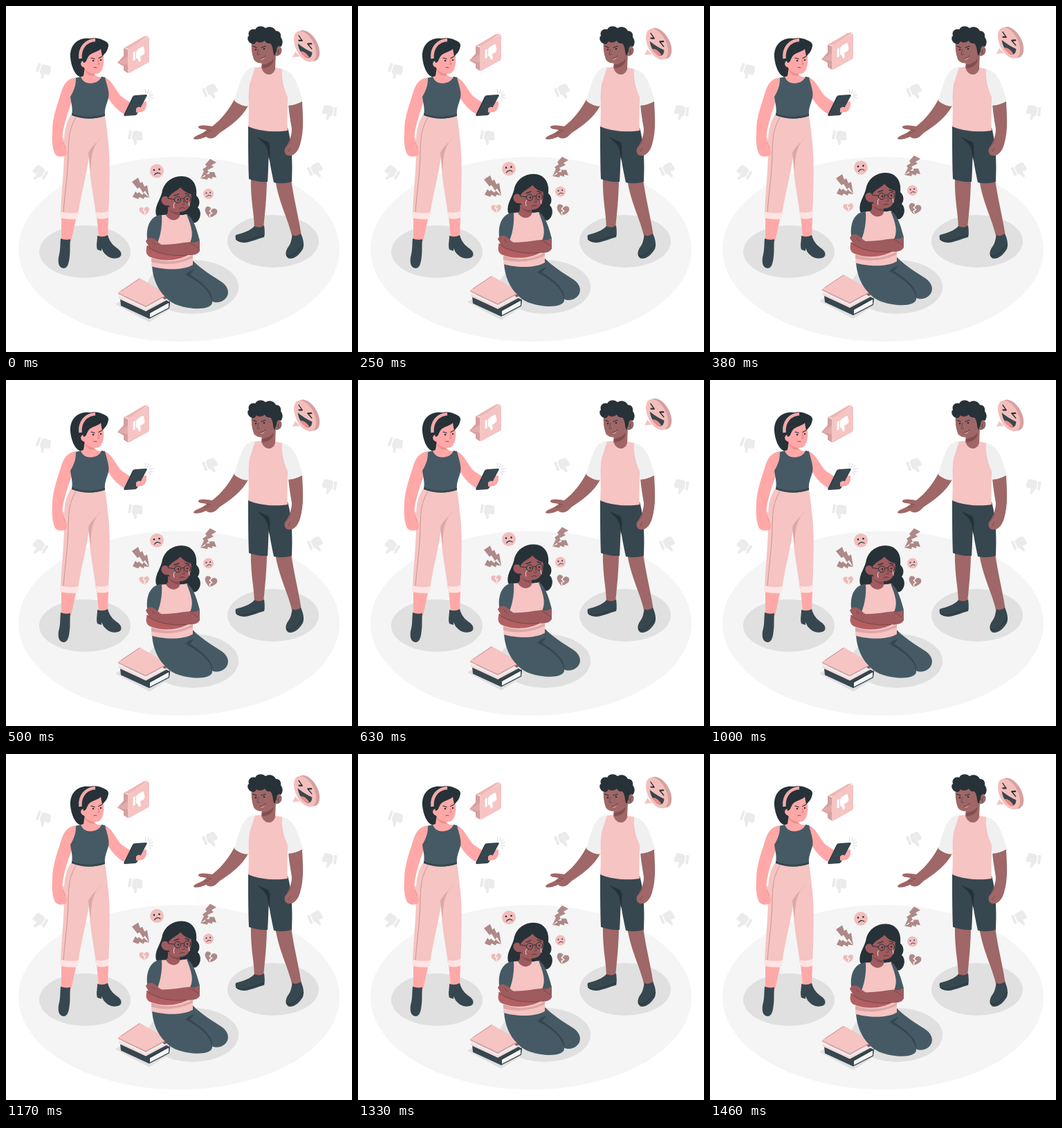
Write an HTML page that moves like this. It is 500 px wide and 500 px high and loops after 1500 ms.

```html
<!DOCTYPE html>
<html lang="en">
<head>
<meta charset="utf-8">
<title>Bullying scene</title>
<style>
html, body { margin: 0; width: 100%; height: 100%; overflow: hidden; background: #fff; }
svg { display: block; width: 100vw; height: 100vh; }
.ink { fill: #263238; }
.slate { fill: #455a64; }
.deep { fill: #37474f; }
.rose { fill: #f5c4c3; }
.peach { fill: #ffa8a7; }
.brown { fill: #9f6767; }
.tan { fill: #9f5b5e; }
.mauve { fill: #ae8988; }
.white { fill: #fff; }
.pen { fill: none; stroke: #263238; stroke-width: 1.2; stroke-linecap: round; stroke-linejoin: round; }
.fine { stroke-width: .7; }
.bold { stroke-width: 2; }
</style>
</head>
<body>
<svg viewBox="0 0 500 500" xmlns="http://www.w3.org/2000/svg">
  <defs>
    <path id="thumb" d="M-10.500 -9 H-6.500 V4 H-10.500 Z M-5 -8 Q-2 -10 1 -10 H6 Q9 -10 9 -7 L10.500 0 Q10.500 3 8 3 H2.500 L3.500 9 Q3 12 0 10.500 L-1.500 6 L-5 2 Z"/>
    <g id="sad">
      <circle r="10" fill="#f1bebd"/>
      <circle class="ink" cx="-4" cy="-1.500" r="1.300"/>
      <circle class="ink" cx="3.500" cy="-2.500" r="1.300"/>
      <path class="pen" d="M-3.500 5.500 Q0 .5 5 4"/>
    </g>
    <g id="heart">
      <path d="M0 8 C-5 5 -10 1 -9 -4 C-8 -8 -2 -8 0 -4 C3 -8 9 -7 9 -2 C9 2 4 6 0 8 Z"/>
      <path d="M0 -5 L-2 -1 L2 1 L-1 4 L1 7" fill="none" stroke="#fff" stroke-width="1.300"/>
    </g>
  </defs>

  <ellipse cx="250" cy="351.500" rx="232" ry="133.500" fill="#f5f5f5"/>
  <g fill="#e0e0e0">
    <ellipse cx="114" cy="355" rx="66" ry="38"/>
    <ellipse cx="386" cy="340" rx="66" ry="38"/>
    <ellipse cx="270" cy="406" rx="66" ry="39"/>
  </g>
  <g id="thumbs" fill="#ebebeb"></g>

  <!-- woman with phone -->
  <g>
    <path class="peach" d="M80 304 H102 L94 340 H80 Z M131 304 H148 L147 334 H134 Z"/>
    <path class="deep" d="M79 336 Q86 339 93 337 C92 348 93 353 92 361 C91 372 89 379 83 379 C76 378 75 371 76 363 C79 353 78 345 79 336 Z"/>
    <path class="deep" d="M132 332 Q140 335 147 331 C150 342 155 346 162 351 C168 356 168 362 162 364 C152 367 145 361 141 356 L138 350 L138 354 L132 352 C130 346 132 340 132 332 Z"/>
    <path class="rose" d="M94 157 C87 168 84 180 84 196 C85 230 80 268 79 300 L104 302 C108 272 116 246 120 218 C120 246 127 275 130 302 L148 300 C150 265 151 215 147 190 C146 176 144 166 143 158 Z"/>
    <path d="M137 190 C133 197 126 199 119 212 L120 222 C121 228 122 235 122.500 241 C123 225 122 205 137 190 Z" fill="#dca7a6"/>
    <path d="M101 161 C91 178 91 190 90 208 C90 240 85 270 83 298" fill="none" stroke="#ba8b8a" stroke-width=".8"/>
    <path d="M78 297 Q92 301 105 298 L103 308 Q90 309 78 306 Z M130 298 Q140 300 149 296 L148 306 Q140 309 132 307 Z" fill="#fde5e4"/>
    <path class="peach" d="M142 103 C153 106 158 122 167 131 L182 141 L175 158 C164 154 154 144 146 130 Z M184 141 C190 136 195 139 203 138 C204 148 197 154 187 154 Z"/>
    <path class="peach" d="M102 103 C90 104 83 112 79 127 C73 147 67 161 67 181 C66 194 67 206 71 214 C75 219 82 218 86 216 C90 213 88 208 85 202 C82 195 81 190 82 184 C84 170 90 152 95 138 Z"/>
    <path d="M83 191 Q82 199 86 205" fill="none" stroke="#e58583" stroke-width=".8"/>
    <path class="peach" d="M111 84 L128 94 C127 101 131 102 138 103 C138 117 110 117 104 104 C111 103 112 98 111 84 Z"/>
    <path d="M113 91 Q121 98 128 97 L127 101 Q117 101 113 91 Z" fill="#f08d8b"/>
    <path class="slate" d="M101 104 L108 102 C112 116 134 114 138 102 L143 103 C146 115 150 125 148 133 C146 141 142 148 143 158 C128 165 108 163 95 157 C97 148 94 140 93 131 C99 122 101 112 101 104 Z"/>
    <path d="M95 155 Q118 164 143 156 V159 Q118 167 95 158 Z" class="deep"/>
    <path class="ink" d="M112 101 C102 107 94 88 93 74 C92 56 104 45 121 47 C134 44 142 50 147 54 C149 61 145 68 139 72 L114 88 Z"/>
    <path class="peach" d="M113 76 C115 67 127 63 137 61 C141 67 142 76 141 83 C140 93 136 99 128 98 C120 97 115 94 113 89 C107 88 106 79 113 79 Z"/>
    <path class="ink" d="M112 82 C107 64 115 48 130 48 C141 47 149 53 148 57 C146 67 139 73 139 73 L137 62 C132 67 123 67 119 73 C116 78 116 82 112 82 Z"/>
    <path d="M107.500 76 C106 61 115 50 129 49" fill="none" stroke="#f3aaa8" stroke-width="4.600"/>
    <path class="pen" d="M123 75 L128 76.500 M134 75.500 L138.500 73"/>
    <circle class="ink" cx="126" cy="79" r="1.300"/>
    <circle class="ink" cx="137" cy="78" r="1.200"/>
    <path d="M133 78 L135 84 L132 84" fill="none" stroke="#d86b69" stroke-width=".8"/>
    <path class="pen fine" d="M127 89 Q129 88 131 89"/>
    <path class="deep" d="M183 131 Q184 129 187 129 L202 128 Q205 128 203 131 L190 155 Q189 158 186 158 L172 159 Q169 159 171 156 Z"/>
    <path d="M184 131 L171 157" stroke="#263238" stroke-width="1"/>
    <path class="peach" d="M188 148 Q192 144 195 147 L199 141 L203 140 Q204 149 197 153 L188 154 Z"/>
    <path id="flash" fill="none" stroke="#c9c9c9" stroke-width=".8"/>
  </g>

  <!-- man pointing -->
  <g>
    <path class="brown" d="M354 248 H377 C377 275 374 300 372 322 L359 324 C359 300 353 280 354 248 Z M389 250 L412 250 C416 280 424 310 427 333 L414 336 C409 310 394 285 389 250 Z"/>
    <path class="deep" d="M359 318 Q367 322 373 317 C374 325 374 331 373 334 C364 336 355 341 345 342 C335 342 330 338 332 331 C342 328 353 325 359 318 Z"/>
    <path class="deep" d="M414 331 Q420 334 426 329 C430 337 431 345 429 351 C425 358 418 366 409 365 C403 362 403 355 408 348 C412 343 412 338 414 331 Z"/>
    <path d="M332 337 Q338 341 348 339 L373 331 M405 360 Q411 364 418 358 L430 344" fill="none" stroke="#263238" stroke-width=".9"/>
    <path class="deep" d="M350 172 L407 176 C411 190 415 215 413 254 Q400 258 387 255 C384 240 381 228 380 214 C379 228 379 240 378 254 Q364 255 351 250 C350 225 350 200 350 172 Z"/>
    <path class="ink" d="M364 190 C369 197 378 198 379 216 L382 227 C380 209 384 201 378 196 Z"/>
    <path class="brown" d="M330 135 L350 144 C341 161 325 173 308 184 C302 191 296 194 289 189 C283 192 274 194 271 192 C271 188 278 187 285 183 L290 179 C284 178 277 178 278 174 C284 171 292 173 298 174 C312 163 322 150 330 135 Z"/>
    <path d="M290 179 L297 181 M285 184 L293 183" fill="none" stroke="#794646" stroke-width=".8"/>
    <path class="brown" d="M408 142 L428 138 C429 160 431 180 425 200 C422 211 415 218 407 216 C402 214 401 207 405 203 C410 195 413 186 413 178 C411 165 409 155 408 142 Z"/>
    <path d="M405 203 Q410 199 411 193 M411 205 L408 211" fill="none" stroke="#794646" stroke-width=".8"/>
    <path d="M361 88 C345 89 340 100 330 137 Q338 144 349 145 L354 120 Z M397 91 C412 92 420 105 429 137 Q420 143 408 144 L400 115 Z" fill="#f0f0f0"/>
    <path class="rose" d="M360 89 L369 88 L389 89 L399 91 C398 106 401 118 407 132 C407 152 406 168 407 180 C390 183 365 181 350 174 C352 150 349 130 352 113 Z"/>
    <path class="brown" d="M370 78 L390 67 L389 91 C386 102 373 102 369 89 Z"/>
    <path d="M370 85 Q382 83 387 76 Q386 88 371 90 Z" fill="#824e4e"/>
    <path class="brown" d="M355 50 C354 60 355 69 358 77 C362 84 371 84 379 80 L389 72 C399 74 402 60 394 58 L383 44 L362 42 Z"/>
    <path class="ink" d="M357 55 C350 54 347 46 351 43 C349 37 354 32 360 34 C364 27 372 29 375 32 C381 28 388 31 390 36 C396 36 398 41 397 45 C401 50 400 56 397 59 C393 57 391 60 391 65 L388 72 C385 68 387 60 382 54 C379 55 375 53 374 50 C369 54 364 53 362 51 C360 55 358 55 357 55 Z"/>
    <path class="pen" d="M357 58 L362 60 M369 60 L375 58"/>
    <circle class="ink" cx="361" cy="63" r="1.300"/>
    <circle class="ink" cx="373" cy="62" r="1.300"/>
    <path d="M365 62 L363 70 L367 70" fill="none" stroke="#6b3d3d" stroke-width=".8"/>
    <path d="M367 76 Q371 76 374 73 Q374 78 369 78 Z" fill="#d98583"/>
    <path class="pen fine" d="M367 76 Q371 76 375 72 M394 63 Q392 66 394 69"/>
  </g>

  <g id="float">
    <!-- thumb bubble -->
    <path d="M170 61 L199 44 L206 43 L178 62 Z" fill="#efb6b4"/>
    <path d="M170 61 L176 63 V97 L170 93 V87 L161 82 L170 72 Z" fill="#d3a09f"/>
    <path d="M161 82 L176 73 V85 Z" fill="#e3acab"/>
    <path class="rose" d="M176 64 Q176 62 178 61 L204 45 Q207 44 207 47 V79 Q207 81 205 82 L178 97 Q176 98 176 95 Z"/>
    <use href="#thumb" class="white" transform="matrix(.8 -.45 0 .95 192 71)"/>

    <!-- laughing bubble -->
    <g transform="matrix(.84 .5 0 1 436.500 57.500)"><circle r="20" fill="#d6a19f"/></g>
    <path class="rose" d="M418 66 L414 74 L425 73 Z"/>
    <g transform="matrix(.8 .5 0 1 432 58.500)">
      <circle r="20" fill="#f3bfbd"/>
      <path class="deep" d="M-13 2 Q0 4 13 2 C12 19 -10 19 -13 2 Z"/>
      <path d="M-8 11 Q0 6 8 11.500 C4 16 -4 16 -8 11 Z" fill="#f08a88"/>
      <path class="pen bold" d="M-11 -10 L-5 -6 L-11 -3 M12 -10 L5 -6 L12 -3"/>
    </g>

    <!-- icons round the girl -->
    <use href="#sad" transform="translate(218 238.500)"/>
    <use href="#sad" transform="translate(292.500 271.500) scale(.75)"/>
    <use href="#heart" transform="translate(200 296) rotate(-8) scale(.8)" fill="#edbbb9"/>
    <use href="#heart" transform="translate(296 298) rotate(14)" class="mauve"/>
    <path class="mauve" d="M182 254 L190 264 L193 262 L198 270 L201 267 L207 277 L204 259 L200 261 L197 254 L194 256 L191 248 Z M183 276 L191 279 L193 276 L199 279 L200 276 L207 277 L199 270 L197 273 L192 269 L190 271 L187 268 Z"/>
    <path class="mauve" d="M295 221 L288 229 L290 232 L284 236 L286 239 L281 249 L293 240 L291 237 L300 233 L297 230 L304 226 Z M301 240 L294 240 L294 243 L288 243 L288 246 L281 249 L291 251 L292 248 L298 250 L298 247 L304 248 Z"/>

    <!-- books -->
    <path d="M158 431 L192 410 L240 436 L207 457 Z" fill="#e0e0e0"/>
    <path class="deep" d="M165 423 L195 406 L237 428 L236 437 L207 452 L166 433 Z"/>
    <path d="M208 444 L235 429 V436 L208 450 Z" fill="#f5f5f5"/>
    <path class="pen fine" d="M207 443 L237 427"/>
    <path d="M162 416 L202 435 L233 418 L232 425 L202 441 L163 421 Z" fill="#eeeeee"/>
    <path d="M163 420 L202 438 L232 423 V425 L202 441 L163 423 Z" fill="#f9d9d8"/>
    <path d="M225 421 L232 417 V423 L229 424 Z" fill="#8e5d5d"/>
    <path class="rose" d="M162 414 L193 393 L233 416 V418 L202 435 L162 416 Z"/>
    <path d="M162 415 L202 434 L233 417 M166 412 L193 394" fill="none" stroke="#c88f8e" stroke-width=".9"/>

    <!-- girl -->
    <path class="ink" d="M254 246 C241 246 230 253 226 266 C224 280 214 288 217 302 C222 309 236 308 243 304 L262 301 C264 310 269 314 274 313 C282 309 283 296 277 291 C281 286 280 278 275 274 C277 257 268 246 254 246 Z"/>
    <path class="slate" d="M211 375 C230 381 255 380 270 368 C282 380 298 390 312 399 C322 406 324 417 316 424 C310 429 303 429 298 427 C299 436 284 438 270 437 C250 435 237 429 230 420 C219 410 212 393 211 375 Z"/>
    <path d="M272 381 C266 382 263 385 259 388 C275 397 294 408 298 427 C301 412 280 397 266 388 Z" class="deep"/>
    <path class="rose" d="M221 303 C232 300 250 304 262 301 C270 316 268 330 270 345 V374 C255 383 225 381 210 376 L213 345 Z"/>
    <path class="slate" d="M225 302 C214 302 206 310 204 325 Q203 335 205 340 Q212 343 219 342 C224 330 226 314 225 302 Z M261 301 C270 305 275 320 280 339 Q272 344 266 342 C273 328 265 312 261 301 Z"/>
    <path class="tan" d="M234 290 L251 296 V304 C247 312 236 311 231 302 C235 299 234 296 234 290 Z"/>
    <path d="M235 293 Q243 300 251 298 L250 302 Q240 301 235 293 Z" fill="#834b4b"/>
    <path class="tan" d="M235 270 C241 267 247 264 250 260 C255 265 261 267 267 267 C269 280 267 294 256 297 C247 299 238 295 235 288 C227 291 220 279 228 275 Q233 274 235 278 Z"/>
    <path class="ink" d="M234 278 C230 264 240 252 253 250 C264 250 271 260 269 272 C262 271 256 267 252 262 C247 268 239 269 234 278 Z"/>
    <g fill="none" stroke="#263238" stroke-width="1">
      <circle cx="248" cy="280" r="4.600"/>
      <circle cx="262" cy="279" r="4.600"/>
      <path d="M252.500 279 Q255 277 257.500 278.500 M243.500 279.500 L234 278"/>
    </g>
    <path class="pen" d="M243 274 L250 271.500 M259 271 L265 273"/>
    <circle class="ink" cx="249" cy="280" r="1.300"/>
    <circle class="ink" cx="262" cy="279" r="1.300"/>
    <path d="M244 284 Q241 287 243 292 M264 283 L265 289" fill="none" stroke="#fff" stroke-width=".8" stroke-linecap="round"/>
    <path d="M256 280 L258 287 L254 287" fill="none" stroke="#6f3b3b" stroke-width=".8"/>
    <path class="pen fine" d="M251 292.500 Q255 290 258 292"/>
    <path d="M210 364 Q240 376 270 360 V364 Q240 378 210 370 Z" fill="#dca7a6"/>
    <path d="M204 346 C201 355 203 361 209 363 C227 370 250 368 264 359 C240 358 220 355 204 346 Z" fill="#b45f62"/>
    <path class="tan" d="M202 340 C204 335 209 334 213 336 C218 338 220 343 225 345 C240 345 254 342 266 341 Q273 343 280 339 V354 C276 361 268 360 261 360 C240 362 222 359 209 352 Z"/>
    <path d="M203 347 C220 359 240 362 262 360 M211 341 L216 345 M266 342 L278 350" fill="none" stroke="#763f40" stroke-width=".8"/>
  </g>
</svg>
<script>
const $ = id => document.getElementById(id);

// x, y, turn, facing
const thumbs = [
  [54, 94, 20, 1], [48, 242, 32, -1], [187, 190, 10, 1],
  [296, 124, -22, 1], [467, 154, 8, -1], [448, 238, -24, 1]
];
$("thumbs").innerHTML = thumbs.map(([x, y, turn, side]) =>
  `<use href="#thumb" transform="translate(${x} ${y}) rotate(${turn}) scale(${side} 1)"/>`).join("");

const ray = deg => {
  const a = deg * Math.PI / 180;
  const at = r => `${203 + r * Math.cos(a)} ${130 + r * Math.sin(a)}`;
  return `M${at(4)} L${at(10)}`;
};
$("flash").setAttribute("d", [-100, -70, -42, -12, 18, 48].map(ray).join(" "));

const LOOP = 1500, RISE = 10;
const start = performance.now();

function draw(ms) {
  const p = (ms % LOOP) / LOOP;
  const lift = RISE * (1 - Math.abs(1 - 2 * p));
  $("float").setAttribute("transform", `translate(0 ${-lift})`);
}

function tick() {
  draw(performance.now() - start);
  requestAnimationFrame(tick);
}
tick();
</script>
</body>
</html>
```
